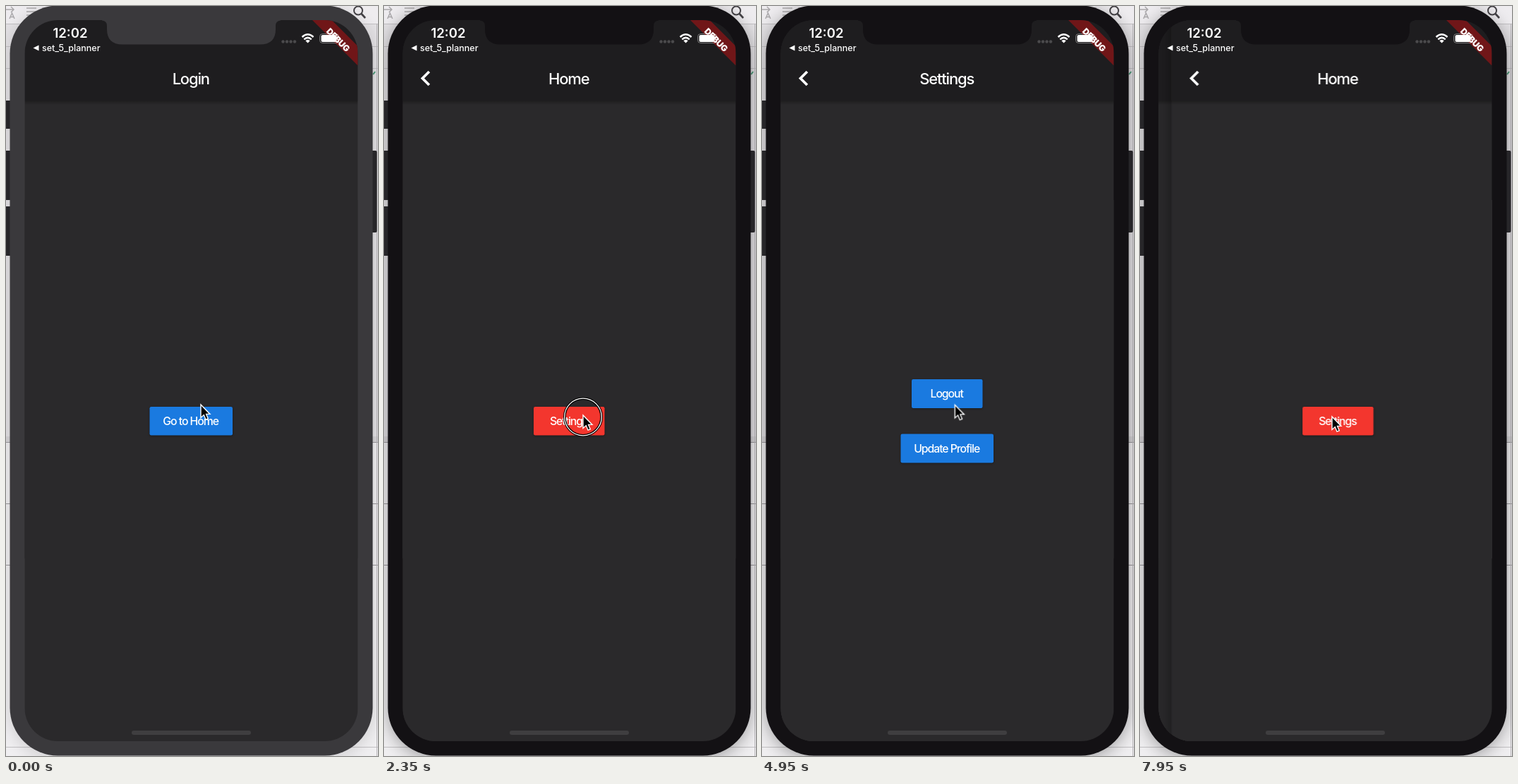
Recreate the animation shown at these times as an HTML page. Size 527 px wide and 1063 px high, loop 8 s.

```html
<!DOCTYPE html>
<html lang="en">
<head>
<meta charset="utf-8">
<title>Phone navigation</title>
<style>
  html, body { margin: 0; width: 100%; height: 100%; overflow: hidden; background: #e3e1e4; }
  svg { display: block; width: 100%; height: 100%; }
  text { font-family: Inter, "Open Sans", sans-serif; font-weight: 500; fill: #fff; }
  .title { font-size: 22px; letter-spacing: -1.2px; text-anchor: middle; }
  .label { font-size: 15.8px; letter-spacing: -1.05px; text-anchor: middle; }
  .blue { fill: #1a7ae0; }
  .red { fill: #f3362e; }
  .btn { filter: drop-shadow(0 1.5px 1.5px rgba(0, 0, 0, .35)); }

  .case, .shade, .page, .pointer, .ring {
    animation: 8s linear infinite;
  }
  .case { animation-name: focus; }
  .shade { animation-name: shade; }
  .pointer { animation-name: move; animation-timing-function: ease-in-out; }
  .ring { animation-name: press; }
  .page { animation-timing-function: cubic-bezier(.35, .91, .33, .97); }
  .login { animation-name: login; }
  .home { animation-name: home; }
  .settings { animation-name: settings; }
  .relogin { animation-name: relogin; }
  .rehome { animation-name: rehome; }

  @keyframes focus {
    0%, 11.23% { fill: #3a393c; }
    11.24%, 100% { fill: #131114; }
  }
  @keyframes shade {
    0%, 11.23% { opacity: .16; }
    11.24%, 100% { opacity: .36; }
  }

  /* Each page slides in from the right, then drifts left under the next one. */
  @keyframes login {
    0%, 12.4% { transform: translateX(0); }
    18.65%, 100% { transform: translateX(-157px); }
  }
  @keyframes home {
    0%, 12.4% { transform: translateX(496px); }
    18.65%, 30.6% { transform: translateX(0); }
    36.85%, 100% { transform: translateX(-157px); }
  }
  @keyframes settings {
    0%, 30.6% { transform: translateX(496px); }
    36.85%, 78.75% { transform: translateX(0); }
    85%, 100% { transform: translateX(-157px); }
  }
  /* The loop cuts the last slide short, so its curve is the first part of the usual one. */
  @keyframes relogin {
    0%, 78.75% { transform: translateX(496px); }
    85% { transform: translateX(0); }
    95.46% { transform: translateX(0); animation-timing-function: cubic-bezier(.404, .78, .45, .948); }
    100% { transform: translateX(-154px); }
  }
  @keyframes rehome {
    0% { transform: translateX(496px); }
    95.46% { transform: translateX(496px); animation-timing-function: cubic-bezier(.404, .78, .45, .948); }
    100% { transform: translateX(10px); }
  }

  @keyframes move {
    0%, .5% { transform: translate(276px, 565px); }
    4% { transform: translate(249px, 573px); }
    7% { transform: translate(268px, 581px); }
    9% { transform: translate(286px, 581px); }
    10.4%, 40% { transform: translate(282px, 580px); }
    41.8%, 58.5% { transform: translate(282px, 575px); }
    63% { transform: translate(272px, 564px); }
    69% { transform: translate(288px, 556px); }
    73%, 80.5% { transform: translate(292px, 550px); }
    86.5%, 100% { transform: translate(272px, 582px); }
  }
  @keyframes press {
    0%, 11.23% { opacity: 0; }
    11.24%, 12.4% { opacity: 1; }
    12.41%, 29.3% { opacity: 0; }
    29.31%, 30.6% { opacity: 1; }
    30.61%, 77.4% { opacity: 0; }
    77.41%, 78.75% { opacity: 1; }
    78.76%, 94.9% { opacity: 0; }
    94.91%, 95.6% { opacity: 1; }
    95.61%, 100% { opacity: 0; }
  }
</style>
</head>
<body>
<svg viewBox="0 0 527 1063" preserveAspectRatio="none">
  <defs>
    <clipPath id="screen"><rect x="26.5" y="20" width="472" height="1022" rx="47"/></clipPath>
    <linearGradient id="edge">
      <stop offset="0" stop-opacity="0"/>
      <stop offset=".3" stop-opacity=".016"/>
      <stop offset=".6" stop-opacity=".07"/>
      <stop offset="1" stop-opacity=".22"/>
    </linearGradient>
    <linearGradient id="under" x2="0" y2="1">
      <stop offset="0" stop-opacity=".3"/>
      <stop offset="1" stop-opacity="0"/>
    </linearGradient>
    <filter id="blur" x="-20%" y="-10%" width="140%" height="120%"><feGaussianBlur stdDeviation="12"/></filter>
    <g id="sheet">
      <rect x="2.5" y="20" width="24" height="1022" fill="url(#edge)"/>
      <rect x="26.5" y="20" width="472" height="1022" fill="#2a292b"/>
      <rect x="26.5" y="134" width="472" height="6" fill="url(#under)"/>
      <rect x="26.5" y="20" width="472" height="114" fill="#1e1d1f"/>
    </g>
    <path id="back" d="M64 93 54.5 102.5 64 112" fill="none" stroke="#fff" stroke-width="3.7"/>
    <g id="loginBody">
      <text class="title" x="261.7" y="110.5">Login</text>
      <rect class="btn blue" x="203.5" y="568" width="117.5" height="40.5" rx="2.3"/>
      <text class="label" x="261.7" y="594">Go to Home</text>
    </g>
    <g id="homeBody">
      <text class="title" x="261.7" y="110.5">Home</text>
      <rect class="btn red" x="212" y="568" width="100.5" height="40.5" rx="2.3"/>
      <text class="label" x="261.7" y="594">Settings</text>
    </g>
  </defs>

  <!-- desktop behind the phone -->
  <rect width="527" height="1063" fill="#e3e1e4"/>
  <rect width="527" height="25" fill="#eeecef"/>
  <rect y="618" width="527" height="445" fill="#f0eff1"/>
  <rect y="610" width="527" height="8" fill="#d6d4d7"/>
  <path d="M0 25.5H527M0 57.5H527M0 88.5H527M0 1050.5H527" stroke="#c2c0c3"/>
  <path d="M0 618.5H527M0 705.5H527M0 792.5H527" stroke="#98969a"/>
  <path d="M525.5 25V1063" stroke="#b5b3b6"/>
  <path d="M520 97 523 93" stroke="#4c9a78" stroke-width="2"/>
  <g fill="none" stroke="#aaa8ab" stroke-width="1.5">
    <path d="M0 5H10M7 1 11 5 7 9M5 18 8.5 10 12 18M6 15.5H11"/>
    <path d="M29 3H43M29 8H43M29 13H40"/>
  </g>
  <path d="M503.5 11 509 17" stroke="#454347" stroke-width="2.6"/>
  <circle cx="499" cy="6.5" r="6" fill="none" stroke="#454347" stroke-width="2"/>
  <rect class="shade" x="6" y="4" width="513" height="1062" rx="68" filter="url(#blur)"/>

  <!-- phone case and side keys -->
  <g fill="#272629">
    <rect x="-4" y="134" width="12" height="40" rx="2"/>
    <rect x="-4" y="205" width="12" height="70" rx="2"/>
    <rect x="-4" y="284" width="12" height="70" rx="2"/>
    <rect x="515" y="205" width="10.5" height="116" rx="2"/>
  </g>
  <rect class="case" x="5.5" y="-.5" width="514" height="1063" rx="68"/>

  <g clip-path="url(#screen)">
    <g class="page login">
      <use href="#sheet"/><use href="#loginBody"/>
    </g>
    <g class="page home">
      <use href="#sheet"/><use href="#back"/><use href="#homeBody"/>
    </g>
    <g class="page settings">
      <use href="#sheet"/><use href="#back"/>
      <text class="title" x="261.7" y="110.5">Settings</text>
      <rect class="btn blue" x="212" y="529" width="100.5" height="41" rx="2.3"/>
      <text class="label" x="261.7" y="555">Logout</text>
      <rect class="btn blue" x="196.5" y="606.5" width="131.5" height="41" rx="2.3"/>
      <text class="label" x="261.7" y="632.5">Update Profile</text>
    </g>
    <g class="page relogin">
      <use href="#sheet"/><use href="#back"/><use href="#loginBody"/>
    </g>
    <g class="page rehome">
      <use href="#sheet"/><use href="#back"/><use href="#homeBody"/>
    </g>

    <path d="M434 20H461.500L498.500 57V84.500Z" fill="#701618"/>
    <text transform="translate(470.500 48) rotate(45)" y="4.300" text-anchor="middle" font-size="12.200" style="font-weight:900;letter-spacing:-.3px">DEBUG</text>

    <!-- status bar -->
    <text x="91" y="44.500" text-anchor="middle" font-size="18.600" style="font-weight:600">12:02</text>
    <path d="M38.500 59.500 46.500 55.500V63.500Z" fill="#fff"/>
    <text x="51" y="64" font-size="12.500">set_5_planner</text>
    <g fill="#4b4a4c">
      <circle cx="392.500" cy="50.500" r="2.200"/>
      <circle cx="398" cy="50.500" r="2.200"/>
      <circle cx="403.500" cy="50.500" r="2.200"/>
      <circle cx="409" cy="50.500" r="2.200"/>
    </g>
    <g fill="none" stroke="#fff" stroke-width="2.500">
      <path d="M419.500 44Q427.500 36.500 435.500 44"/>
      <path d="M422.300 47.300Q427.500 42.500 432.700 47.300"/>
    </g>
    <path d="M424.300 49.300Q427.500 46.500 430.700 49.300L427.500 52.500Z" fill="#fff"/>
    <rect x="444.500" y="39.500" width="27" height="13" rx="4" fill="none" stroke="#fff" stroke-opacity=".4"/>
    <rect x="446.500" y="41" width="22" height="10" rx="2.300" fill="#fff"/>
    <rect x="178" y="1027" width="169" height="6" rx="3" fill="#3f3e40"/>
  </g>
  <path class="case" d="M136 19H389V20.500Q382 21 382 28V33Q382 54.500 360 54.500H165Q143 54.500 143 33V28Q143 21 136 20.500Z"/>

  <g class="pointer">
    <g class="ring" fill="none">
      <circle cy="2.500" r="26.200" stroke="#000" stroke-width="3.600"/>
      <circle cy="2.500" r="26.300" stroke="#fff" stroke-width="1.300"/>
    </g>
    <path d="M0 0V18.500L4.300 14.600 7 21.200 10.300 19.800 7.600 13.400H13Z" stroke="#fff" stroke-width="1.400"/>
  </g>
</svg>
</body>
</html>
```
